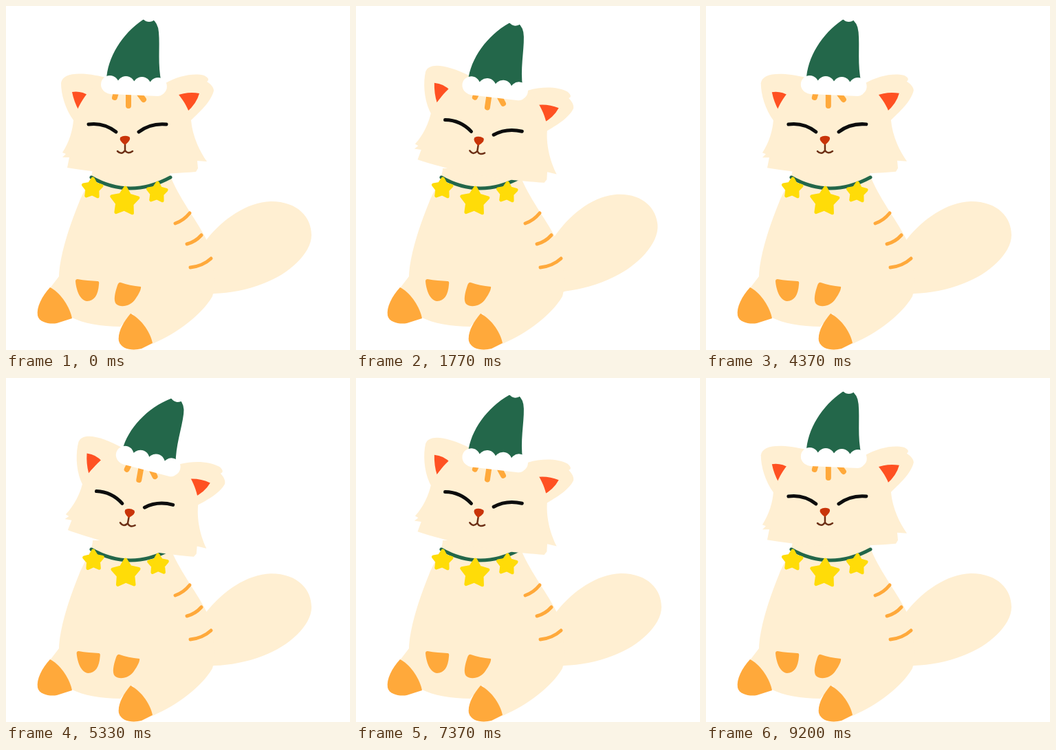
These frames come from a looping animation (500x500 px, 9.51 s). An HTML page:

```html
<!DOCTYPE html>
<html lang="en">
<head>
<meta charset="utf-8">
<title>Cat in a green hat</title>
<style>
html, body { margin: 0; width: 100%; height: 100%; overflow: hidden; background: #fff; }
svg { display: block; width: 100%; height: 100%; }
.cream { fill: #ffefd2; }
.orange { fill: #ffa93b; }
.red { fill: #ff5122; }
.line { fill: none; stroke-linecap: round; stroke-linejoin: round; }
.star { fill: #ffdc08; stroke: #ffdc08; stroke-width: 5; stroke-linejoin: round; }
</style>
</head>
<body>
<svg viewBox="0 0 500 500">
  <path id="tail" class="cream" d="M270 365L292 339C315 310 350 285 385 284C425 284 444 308 444 333C444 360 410 390 375 403C350 413 325 417 303 418L265 425Z"/>
  <path class="cream" d="M126 236C126 250 112 270 106 286C90 325 78 365 77 393L64 410L96 453C112 461 138 466 166 466L184 447L213 491C250 475 285 448 300 422C306 405 302 365 292 341C280 315 255 285 240 250L236 236Z"/>
  <path class="line" stroke="#ffa93b" stroke-width="5" d="M246 316Q258 312 267 301M263 346Q275 343 284 333M268 380Q286 378 298 367"/>
  <path class="orange" d="M64 409C52 422 44 438 46 450C48 460 64 463 74 461L96 454C93 438 80 418 66 410Z"/>
  <path class="orange" d="M181 447C170 460 162 475 164 487C168 500 185 501 197 498L213 490C210 475 198 456 181 447Z"/>
  <path id="pawL" class="orange" d="M104 397C114 399 124 399 133 400Q136 400 135 405C134 420 128 429 118 429C107 428 102 412 101 400Q101 397 104 397Z"/>
  <path id="pawR" class="orange" d="M167 402Q164 401 162 406C158 418 156 428 160 433C168 440 182 435 188 426C193 419 197 411 196 408C185 407 175 405 167 402Z"/>
  <path class="line" stroke="#23674a" stroke-width="5" d="M124 249Q180 281 239 249"/>
  <g id="stars"></g>
  <g id="head">
    <g id="earL">
      <path class="cream" d="M98 166C86 150 80 128 80 112C82 97 108 95 145 104L160 150L110 180Z"/>
      <path class="red" d="M96 125Q110 123 121 131Q111 141 106 152Q99 140 96 125Z"/>
    </g>
    <g id="earR">
      <path class="cream" d="M232 112C250 102 272 97 288 101C294 104 296 107 292 110C297 113 302 118 302 123C298 140 280 155 269 166L220 170Z"/>
      <path class="red" d="M246 131Q263 124 281 127Q277 142 263 154Q257 142 246 131Z"/>
    </g>
    <path class="cream" d="M98 166C97 180 92 198 82 213L87 215L82 220L92 220L89 235C105 238 125 240 150 243C190 246 240 244 276 241L279 236L278 225L292 226C282 212 271 190 269 166C268 150 250 122 232 112L140 106C115 125 105 145 98 166Z"/>
    <path class="line" stroke="#ffa93b" stroke-width="8" d="M160 126L158 133M178 125L178 145M194 128L200 136"/>
    <path class="line" stroke="#0d0d0d" stroke-width="5" d="M120 172Q142 169 160 183M193 183Q210 170 233 172"/>
    <path class="line" stroke="#6d3016" stroke-width="2.5" d="M173 200V210M162 211Q168 217 173 210Q177 216 184 211"/>
    <path fill="#c93409" d="M166 191Q172 187 179 190Q183 194 173 202Q164 196 166 191Z"/>
    <g id="hat">
      <path fill="#23674a" d="M146 108C147 75 169 40 199 20L211 18Q221 24 222 38C224 60 220 85 226 112Z"/>
      <circle cx="208" cy="12" r="11" fill="#fff"/>
      <path class="line" stroke="#fff" stroke-width="20" d="M152 118L221 121"/>
      <g id="rim" fill="#fff"></g>
    </g>
  </g>
</svg>
<script>
const LOOP = 9510, PASS = 4770;
const TILT = 8.5; // resting lean of the head, degrees
const { PI, sin, cos, exp, min, max } = Math;
const $ = id => document.getElementById(id);

function add(parent, tag, attrs) {
  const el = document.createElementNS("http://www.w3.org/2000/svg", tag);
  for (const k in attrs) el.setAttribute(k, attrs[k]);
  return parent.appendChild(el);
}

function starPoints(x, y, r) {
  return Array.from({ length: 10 }, (_, i) => {
    const a = i * PI / 5 - PI / 2, d = i % 2 ? r * 0.56 : r;
    return (x + d * cos(a)).toFixed(1) + "," + (y + d * sin(a)).toFixed(1);
  }).join(" ");
}

const stars = [-1, 0, 1].map(i => {
  const x = 172.5 + 47 * i, y = i ? 268 + 3 * i : 284, r = i ? 14 : 20;
  return { x, y, el: add($("stars"), "polygon", { class: "star", points: starPoints(x, y, r) }) };
});
for (let i = 0; i < 4; i++)
  add($("rim"), "circle", { cx: 151 + 23.3 * i, cy: 114 + i, r: 13 });

// Smooth step from 0 to 1.
function ease(t, start, length) {
  const u = min(1, max(0, (t - start) / length));
  return u * u * (3 - 2 * u);
}

// Step from 0 to 1 that overshoots once after the given peak time.
function spring(t, start, peak) {
  const u = max(0, t - start) / peak;
  return 1 - exp(-1.5 * u) * cos(PI * u);
}

// Fading sine made of a whole number of half swings.
function sway(t, start, half, count) {
  const u = min(count, max(0, (t - start) / half));
  return exp(-0.96 * u) * sin(PI * u);
}

const move = (el, s) => el.setAttribute("transform", s);
const turn = (el, a, x, y) => move(el, `rotate(${a.toFixed(3)} ${x} ${y})`);

function draw(ms) {
  const t = (ms % LOOP) % PASS;
  const head = TILT * (spring(t, 300, 240) - spring(t, 3100, 440));
  const lag = ease(t, 520, 600) - ease(t, 3100, 750);
  const tail = 21.8 * (sway(t, 560, 960, 2) - sway(t, 3080, 960, 1));
  const paws = sin(2 * PI * min(1, max(0, (t - 300) / 1470)));
  const swing = 1.6 * (sway(t, 300, 480, 1) - 0.8 * sway(t, 3300, 480, 1));

  turn($("head"), head, 168, 233);
  turn($("earL"), head * 0.5, 150, 130);
  turn($("earR"), head * 0.5, 235, 125);
  turn($("hat"), 0.2 * head - 0.7 * TILT * lag, 185, 128);
  turn($("tail"), tail, 262, 393);
  move($("pawL"), `translate(${paws * 1.8} 0)`);
  move($("pawR"), `translate(${paws * -2.2} 0)`);
  for (const s of stars)
    move(s.el, `translate(${swing * 1.6} 0) rotate(${3 - swing * 4} ${s.x} ${s.y})`);
}

const start = performance.now();
function frame() {
  draw(performance.now() - start);
  requestAnimationFrame(frame);
}
frame();
</script>
</body>
</html>
```
